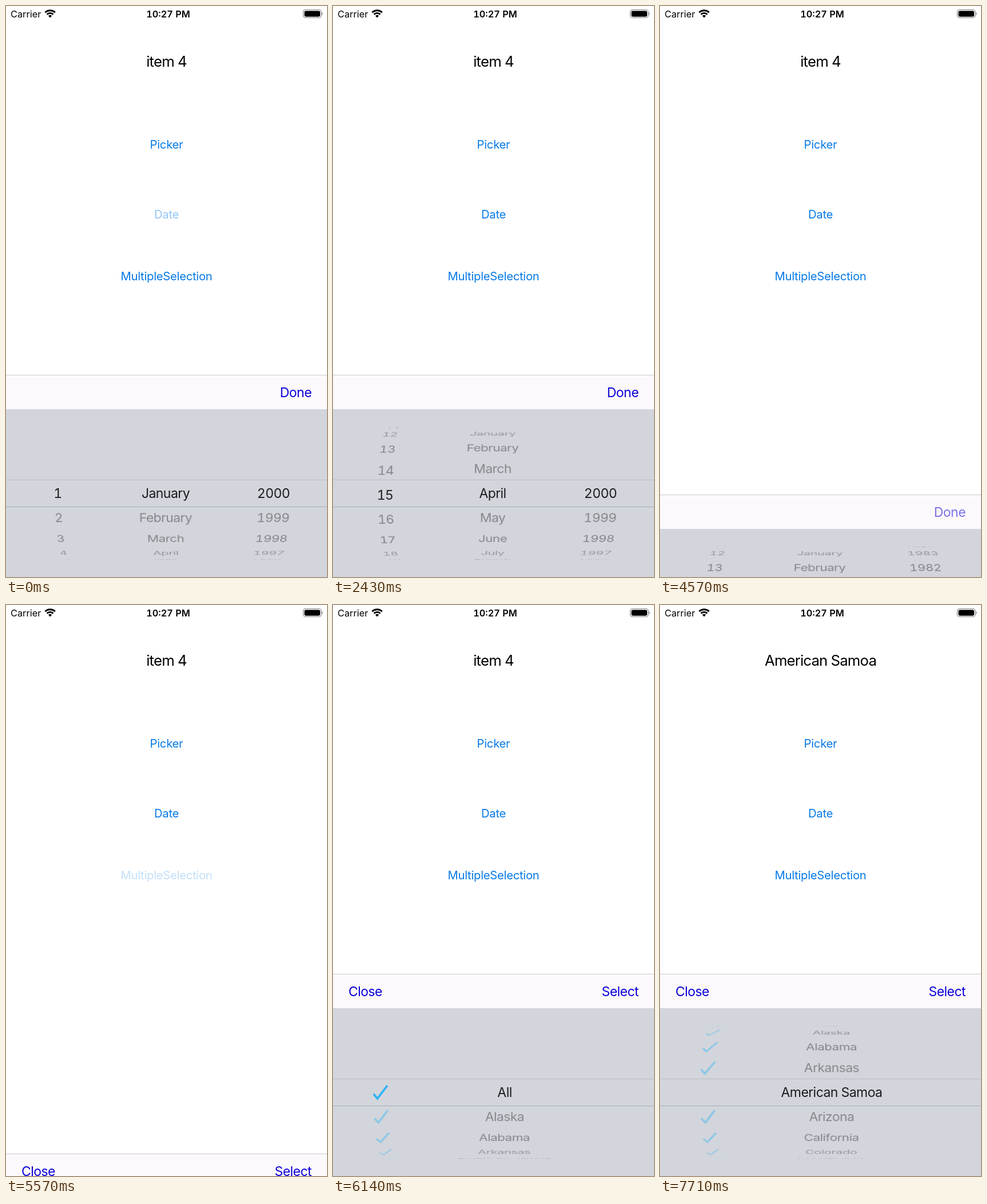
These frames come from a looping animation (561x997 px, 8 s). An HTML page:

```html
<!DOCTYPE html>
<html lang="en">
<head>
<meta charset="utf-8">
<title>Pickers</title>
<style>
html, body { margin: 0; width: 100%; height: 100%; overflow: hidden; background: #fff; }
#stage { position: relative; width: 561px; height: 997px; overflow: hidden; background: #fff;
  font-family: Inter, Roboto, sans-serif; font-variant-numeric: tabular-nums; color: #000; }
#stage > svg { position: absolute; left: 0; top: 0; }
.t { position: absolute; height: 32px; margin-top: -16px; line-height: 32px; white-space: nowrap; }
.mid { left: 0; width: 561px; text-align: center; }
.status { font-size: 16.3px; top: 14px; }
.label { font-size: 25.7px; letter-spacing: -.8px; top: 96.5px; }
.link { font-size: 20.3px; letter-spacing: -.3px; color: #077ae6; }
#sheet { position: absolute; left: 0; top: 644px; width: 561px; height: 353px; background: #d2d5db; }
.bar { position: absolute; left: 0; top: 0; width: 561px; height: 59px; background: #fbf9fc;
  border-top: 1px solid #cbc9cc; }
.btn { font-size: 23px; letter-spacing: -.55px; color: #0d00d8; top: 30px; }
.wheel { position: absolute; left: 0; top: 60px; width: 561px; height: 293px;
  perspective: 1270px; perspective-origin: 280.5px 146.6px; clip-path: inset(27px 0); }
.band { background: #d2d5db; clip-path: inset(123px 0 123px); }
.row { position: absolute; top: 130.6px; width: 200px; height: 32px; margin-left: -100px;
  line-height: 32px; text-align: center; font-size: 23px; letter-spacing: -.55px;
  color: #1c1c1e; white-space: nowrap; }
.row svg { display: block; margin: 2px auto; }
.line { position: absolute; left: 0; width: 561px; height: 1px; }
</style>
</head>
<body>
<div id="stage">
  <svg width="561" height="30">
    <g fill="none" stroke="#000" stroke-width="2.9">
      <path d="M68.4 11.2a12.6 12.6 0 0 1 17.4 0"/>
      <path d="M71.6 14.6a8 8 0 0 1 11 0"/>
    </g>
    <path d="M77.1 20.4l-3.1 -3.3a4.6 4.6 0 0 1 6.2 0z"/>
    <rect x="519.5" y="6.5" width="31.5" height="14" rx="4" fill="none" stroke="#858585" stroke-width="1.2"/>
    <rect x="521.5" y="8.4" width="27.5" height="10.3" rx="2.4"/>
    <path d="M552.3 11a3 3 0 0 1 0 5z" fill="#777"/>
  </svg>
  <div class="t status" style="left:8px">Carrier</div>
  <div class="t status mid" style="left:3px;font-weight:600">10:27 PM</div>
  <div class="t label mid" id="label">item 4</div>
  <div class="t link mid" style="top:241.5px">Picker</div>
  <div class="t link mid" style="top:363.5px" id="date">Date</div>
  <div class="t link mid" style="top:471.5px" id="multi">MultipleSelection</div>
  <div id="sheet">
    <div class="bar">
      <div class="t btn" id="close" style="left:27px">Close</div>
      <div class="t btn" id="done" style="right:27px">Done</div>
      <div class="t btn" id="select" style="right:27px">Select</div>
    </div>
    <div class="wheel"></div>
    <div class="wheel band"></div>
    <div class="line" style="top:183px;background:#b9bdc5"></div>
    <div class="line" style="top:230px;background:#a9adb6"></div>
  </div>
</div>
<script>
const $ = id => document.getElementById(id);
const LOOP = 8000, FPS = 7;
const STEP = 19.8, RADIUS = 127, DIM = .43;

const range = (n, f) => Array.from({ length: n }, (_, i) => f(i));
const months = 'January February March April May June July August September October November December'.split(' ');
const states = ['All', 'Alaska', 'Alabama', 'Arkansas', 'American Samoa', 'Arizona', 'California', 'Colorado', 'Connecticut'];
const tick = '<svg width="28" height="28"><path d="M1.8 16.6L8.6 24.8L26 2" fill="none" stroke="#2cb3f6" stroke-width="3.6"/></svg>';

// Each row exists twice: dimmed on the drum, dark inside the selection band.
const layers = document.querySelectorAll('.wheel');
function column(x, items) {
  return [...layers].map(layer => items.map(html => {
    const el = document.createElement('div');
    el.className = 'row';
    el.style.left = x + 'px';
    el.innerHTML = html;
    return layer.appendChild(el);
  }));
}
const days = column(90.5, range(31, i => i + 1));
const monthCol = column(279, months);
const years = column(467.5, range(31, i => 2000 - i));
const ticks = column(82.5, states.map(() => tick));
const stateCol = column(300, states);

function turn(col, pos, shown) {
  col.forEach((rows, band) => rows.forEach((el, i) => {
    const a = (i - pos) * STEP, visible = shown && Math.abs(a) < 88;
    el.style.display = visible ? '' : 'none';
    if (!visible) return;
    el.style.transform = `translateZ(${-RADIUS}px) rotateX(${-a}deg) translateZ(${RADIUS}px)`;
    el.style.opacity = band ? 1 : DIM * Math.min(1, .25 + Math.cos(a * Math.PI / 180));
  }));
}

const out = (t, from, to) => {
  const p = Math.min(1, Math.max(0, (t - from) / (to - from)));
  return 1 - (1 - p) ** 2;
};
const spring = (t, from) => {
  const x = Math.max(0, t - from) * .0183;
  return 1 - (1 + x) * Math.exp(-x);
};
// Button highlight: dims on touch, fades back after release.
const press = (t, down, up) => t < down ? 1 : .2 + .8 * out(t, up, up + 450);

function draw(t) {
  const dating = t < 5200, picked = t > 6990;
  $('label').textContent = picked ? 'American Samoa' : 'item 4';
  $('date').style.opacity = press(t, -200, -70);
  $('multi').style.opacity = press(t, 5420, 5560);
  $('done').style.opacity = press(t, 4420, 4464);
  $('done').hidden = !dating;
  $('close').hidden = $('select').hidden = dating;

  const drop = dating ? spring(t, 4463) : 1 - spring(t, 5540);
  $('sheet').style.transform = `translateY(${Math.round(354 * drop)}px)`;

  turn(days, t < 3700 ? 13.93 * out(t, 1520, 2428) : 14, dating);
  turn(monthCol, 3 * out(t, 640, 1142), dating);
  turn(years, 20 * out(t, 3221, 3857), dating);
  const pos = 4 * out(t, 6500, 7000);
  turn(stateCol, pos, !dating);
  turn(ticks, pos, !dating);
  for (const rows of ticks) rows[4].style.visibility = picked ? 'hidden' : '';
}

const start = performance.now();
function frame() {
  const t = (performance.now() - start) % LOOP;
  draw(Math.floor(t * FPS / 1000 + .05) * 1000 / FPS);
  requestAnimationFrame(frame);
}
frame();
</script>
</body>
</html>
```
